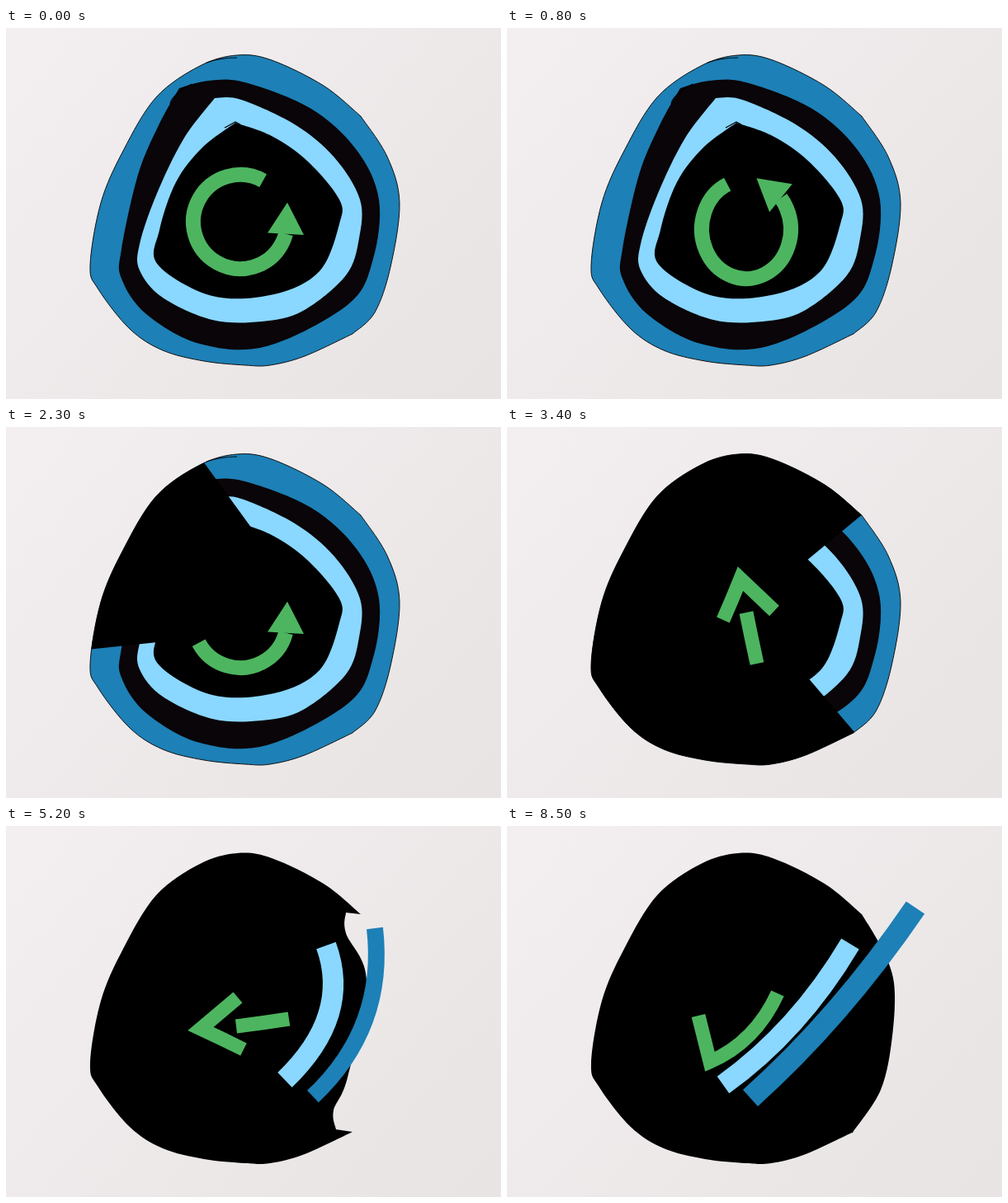
An HTML page with a canvas for the animation above (8.6 s loop, 600x450 px).

```html
<!DOCTYPE html>
<html lang="en">
<head>
<meta charset="utf-8">
<title>Refresh to check</title>
<style>
html, body { margin: 0; width: 100%; height: 100%; overflow: hidden; background: #ece9ea; }
canvas { display: block; width: 600px; height: 450px; }
</style>
</head>
<body>
<canvas id="stage" width="600" height="450"></canvas>
<script>
const g = document.getElementById('stage').getContext('2d');
const LOOP = 8600, STEP = 100, RAD = Math.PI / 180;
const BLUE = '#1d80b6', SKY = '#8ad7ff', GREEN = '#4db560', INK = '#090508';
const PEN = 17;

const mix = (a, b, k) => a + (b - a) * k;
const ramp = (t, from, to) => Math.min(1, Math.max(0, (t - from) / (to - from)));

// "x,y x,y" -> [[x, y], ...]
const pts = s => s.trim().split(/\s+/).map(p => p.split(',').map(Number));

// Smooth sides through key points, joined by straight corners.
function outline(...sides) {
  const path = new Path2D();
  sides.forEach((s, n) => {
    path[n ? 'lineTo' : 'moveTo'](...s[0]);
    for (let i = 0; i < s.length - 1; i++) {
      const b = s[i], c = s[i + 1], a = s[i - 1] || b, d = s[i + 2] || c;
      path.bezierCurveTo(b[0] + (c[0] - a[0]) / 6, b[1] + (c[1] - a[1]) / 6,
        c[0] - (d[0] - b[0]) / 6, c[1] - (d[1] - b[1]) / 6, ...c);
    }
  });
  path.closePath();
  return path;
}
const ring = s => { const p = pts(s); return outline([...p, p[0]]); };

function spin(list, deg, [cx, cy]) {
  const c = Math.cos(deg * RAD), s = Math.sin(deg * RAD);
  return list.map(([x, y]) => [
    cx + (x - cx) * c - (y - cy) * s,
    cy + (x - cx) * s + (y - cy) * c
  ]);
}

// Blend two point lists; with deg the change turns about a pivot.
function morph(a, b, k, deg = 0, pivot = [288, 237]) {
  const p = spin(a, deg * k, pivot), q = spin(b, deg * (k - 1), pivot);
  return p.map((v, i) => [mix(v[0], q[i][0], k), mix(v[1], q[i][1], k)]);
}

function fill(path, color) {
  g.fillStyle = color;
  g.fill(path);
}
function line(path, color, width) {
  g.strokeStyle = color;
  g.lineWidth = width;
  g.stroke(path);
}
// A curve through start, control and end, then straight on to any further points.
function brush([a, c, b, ...rest], color, width) {
  line(new Path2D(`M${a}Q${c} ${b}` + rest.map(p => 'L' + p).join('')), color, width);
}

const bodyLeft = pts(`420,371 362,398 320,409 290,409 240,404 190,391 150,365 112,317 102,288
  115,212 142,149 182,84 235,46 280,33 322,39 385,70 430,107`);
const bodyRight = [
  '430,107 462,156 477,212 466,290 447,345 420,371',
  '412,105 412,130 437,188 414,305 397,345 400,368',
  '430,107 453,146 469,190 467,255 453,320 418,373'
].map(pts);
const disc = outline(bodyLeft, bodyRight[0]);
const rings = [
  [ring(`210,73 245,64 290,66 370,98 425,148 452,208 445,280 415,335 316,386 235,383
    170,347 140,304 140,268 160,178 185,118`), INK],
  [ring(`253,85 285,87 350,117 398,157 429,208 428,255 412,300 360,343 310,356 250,354
    190,327 162,294 162,262 182,203 215,135`), SKY],
  [ring(`278,115 322,131 366,162 404,208 404,238 380,295 325,323 250,325 184,287 186,245
    206,187 238,145`), '#000']
];

// Poses of each brush stroke, in order of time.
const skyBar = ['377,151 458,222 376,317', '388,145 419,230 338,308', '416,143 353,249 262,314'].map(pts);
const blueBar = ['419,116 511,223 412,358', '447,124 461,244 372,328', '495,99 405,231 295,330'].map(pts);
const shaft = ['233,265 274,331 340,250', '303,287 296,255 290,225', '343,234 311,239 279,243',
  '246,286 246,286 246,286'].map(pts);
const head = ['325,246 333,236 341,228 354,247', '262,234 273,209 283,184 324,223',
  '288,271 262,258 236,246 281,208', '328,203 301,262 246,286 232,230'].map(pts);
const TIMES = [2300, 3400, 5200, 5400];
const TURNS = [0, -86, -64];

function background() {
  const paper = g.createLinearGradient(60, 0, 540, 450);
  paper.addColorStop(0, '#f3eff1');
  paper.addColorStop(1, '#e8e4e3');
  g.fillStyle = paper;
  g.fillRect(0, 0, 600, 450);
}

function wedge(t) {
  const open = ramp(t, 2000, 2300), k = ramp(t, 2300, 3400);
  const x = mix(383, 293, k), y = mix(240, 220, k);
  const from = mix(mix(205, 174, open), 49.5, k);
  const to = mix(mix(205, 234, open), 320.4, k);
  const cut = new Path2D();
  cut.moveTo(x, y);
  cut.arc(x, y, 600, from * RAD, to * RAD);
  g.save();
  g.clip(disc);
  fill(cut, '#000');
  g.restore();
}

function ringScene(t) {
  fill(disc, BLUE);
  line(disc, '#111', 1);
  rings.forEach(([path, color]) => fill(path, color));
  line(new Path2D('M243 42Q260 36 280 36M199 92Q201 81 225 68M265 121L278 114L284 117'), '#000', 1.2);
  wedge(t);
}

function barScene(t, blend) {
  fill(outline(bodyLeft, blend(bodyRight)), '#000');
  brush(blend(skyBar), SKY, 25);
  brush(blend(blueBar), BLUE, t < 5300 ? mix(26, 20, ramp(t, 3400, 5200)) : 27);
}

// Elliptic arc whose head leans slightly inwards; its tail is eaten before it straightens.
function roundArrow(t) {
  const k = t < 800 ? t / 800 : 1 - ramp(t, 800, 1800);
  const turn = t < 800 ? -54 * k : mix(-54, -360, 1 - k);
  const cx = mix(284, 290, k), cy = mix(235, 244, k);
  const rx = mix(57, 54, k), ry = mix(57, 60, k);
  const end = (15 + turn) * RAD;
  const tail = (-61 + turn - 147 * ramp(t, 2000, 2300)) * RAD;
  const arc = new Path2D();
  arc.ellipse(cx, cy, rx, ry, 0, tail, end, true);
  line(arc, GREEN, PEN + 1);

  const base = [cx + rx * Math.cos(end), cy + ry * Math.sin(end)];
  const tip = [[0, 22], [38, 0], [0, -22]].map(([x, y]) => [base[0] + x, base[1] + y]);
  fill(new Path2D('M' + spin(tip, 15 + turn - 102, base).join('L') + 'Z'), GREEN);
}

function draw(now) {
  const t = Math.floor((now - start) % LOOP / STEP) * STEP;
  const i = t <= TIMES[1] ? 0 : t <= TIMES[2] ? 1 : 2;
  const k = ramp(t, TIMES[i], TIMES[i + 1]);
  background();
  if (i) barScene(t, poses => morph(poses[i - 1], poses[i], k));
  else ringScene(t);
  if (t <= TIMES[0]) return roundArrow(t);
  const blend = poses => morph(poses[i], poses[i + 1], k, TURNS[i]);
  brush(blend(shaft), GREEN, PEN);
  brush(blend(head), GREEN, PEN);
}

const start = performance.now();
function tick() {
  draw(performance.now());
  requestAnimationFrame(tick);
}
tick();
</script>
</body>
</html>
```
